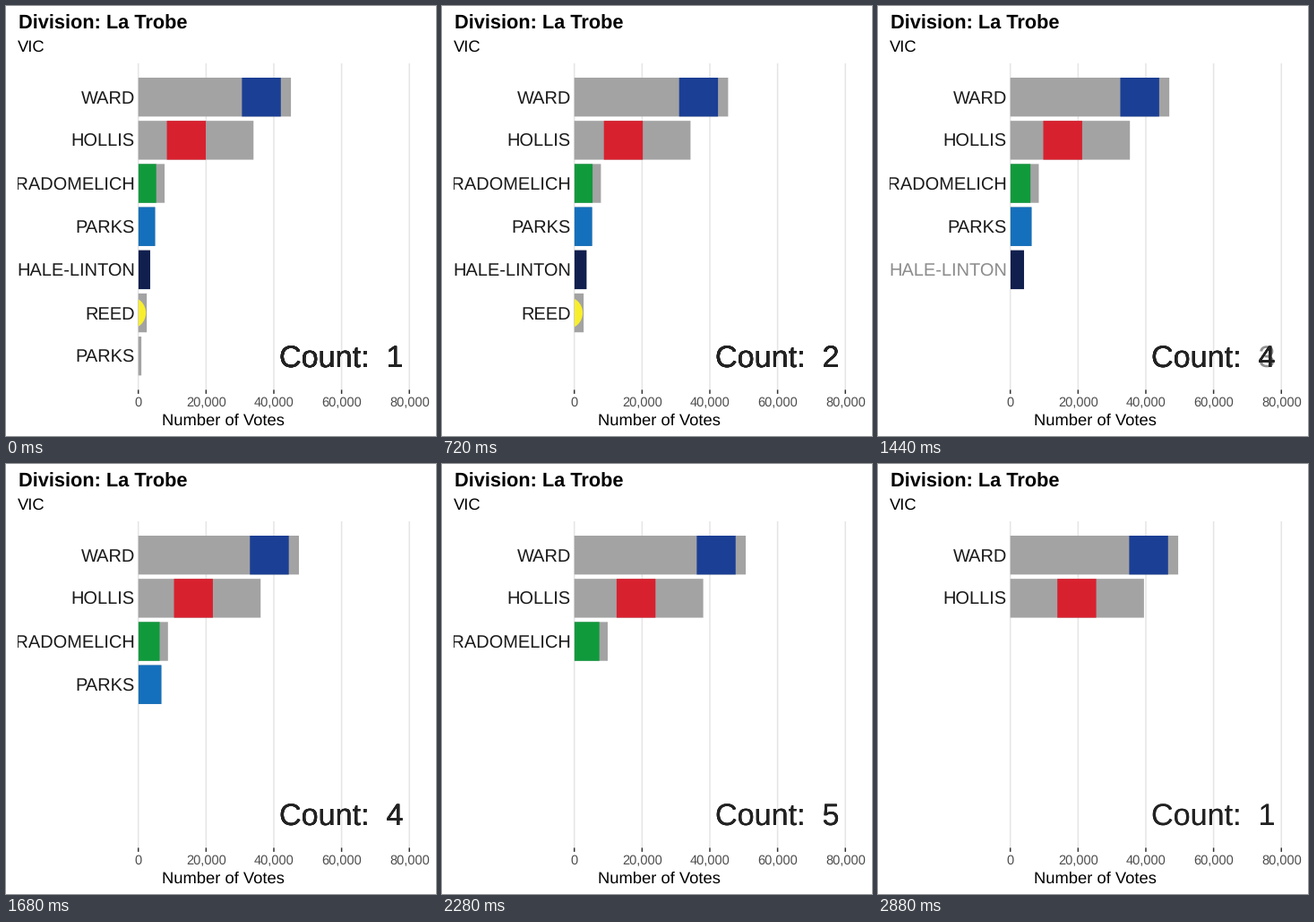
These frames come from a looping animation (480x480 px, 3000 ms). A matplotlib script:

```python
import matplotlib.pyplot as plt
from matplotlib.animation import ArtistAnimation
from matplotlib.patches import Circle, Rectangle

plt.rcParams.update({"font.family": "Liberation Sans", "text.hinting": "none"})

SIZE, DPI, FRAMES, INTERVAL = 480, 100, 25, 120
X0, PX_PER_1000 = 147.7, 3.782
TOP, BOTTOM = 64, 428.4
ROW0, ROW_STEP, BAR_H = 101.7, 48.17, 43.4

# Thousands of votes at each successive count; a short list means elimination.
# Logo: kind, colour, distance of its centre from the bar end, size.
CANDIDATES = [
    ("WARD", [45.05, 45.4, 46.45, 47.4, 50.6, 54.05], ("square", "#1B3F94", 33, BAR_H)),
    ("HOLLIS", [34.0, 34.3, 34.5, 36.1, 38.05, 44.9], ("square", "#D8212F", 75, BAR_H)),
    ("DRADOMELICH", [7.75, 7.85, 8.05, 8.75, 9.85], ("square", "#109A3C", 31, BAR_H)),
    ("PARKS", [4.95, 5.25, 5.75, 6.8], ("square", "#1470BC", BAR_H / 2, BAR_H)),
    ("HALE-LINTON", [3.5, 3.6, 4.05], ("square", "#101F4E", BAR_H / 2, BAR_H)),
    ("REED", [2.5, 2.75], ("circle", "#F8EE2C", 19, 36)),
    ("PARKS", [0.9], None),
]
# First and last frame of the move out of each count
MOVES = [(1, 4), (6, 9), (11, 13), (15, 17), (19, 21), (23, 25)]

fig = plt.figure(figsize=(SIZE / DPI, SIZE / DPI), dpi=DPI, facecolor="white")
ax = fig.add_axes([0, 0, 1, 1])
ax.set_xlim(0, SIZE)
ax.set_ylim(SIZE, 0)
ax.axis("off")


def hidden_box(x):
    box = Rectangle((x, 0), SIZE - x, SIZE, visible=False)
    return ax.add_patch(box)


panel_clip = hidden_box(X0)
label_clip = hidden_box(13)


def text(x, y, s, px, color="black", **kw):
    return ax.text(x, y, s, fontsize=px * 72 / DPI, color=color, va="baseline", **kw)


def line(x, y0, y1, color):
    ax.plot([x, x], [y0, y1], color=color, lw=1.5 * 72 / DPI,
            solid_capstyle="butt", zorder=0, snap=False)


def draw_axes():
    text(13.5, 25.5, "Division: La Trobe", 21.8, weight="bold")
    text(13, 50.6, "VIC", 18.33)
    text(242.3, 467.6, "Number of Votes", 18.33, ha="center")
    for votes in range(0, 100, 20):
        x = X0 + votes * PX_PER_1000
        line(x, TOP, BOTTOM, "#E5E5E5")
        line(x, BOTTOM, BOTTOM + 4.5, "#333333")
        text(x, 447.2, f"{votes * 1000:,}", 14.67, "#4D4D4D", ha="center")


def ease(p):
    return 4 * p ** 3 if p < 0.5 else 1 - 4 * (1 - p) ** 3


def phase(frame):
    """Current count index and eased progress towards the next one."""
    for k, (start, end) in enumerate(MOVES):
        if frame <= start:
            return k, 0.0
        if frame < end:
            return k, ease((frame - start) / (end - start))


def draw_logo(logo, end, y):
    kind, color, back, size = logo
    x = end - back
    if kind == "circle":
        shape = Circle((x, y), size / 2, fc=color, lw=0, zorder=2)
    else:
        shape = Rectangle((x - size / 2, y - size / 2), size, size,
                          fc=color, lw=0, zorder=2, snap=False)
    ax.add_patch(shape)
    shape.set_clip_path(panel_clip)
    return shape


def draw_row(i, name, value, logo, alpha):
    y = ROW0 + i * ROW_STEP
    width = value * PX_PER_1000
    bar = Rectangle((X0, y - BAR_H / 2), width, BAR_H, fc="#A3A3A3", lw=0,
                    alpha=alpha, zorder=1, snap=False)
    ax.add_patch(bar)
    label = text(144, y + 7.4, name, 20, "#1A1A1A", ha="right",
                 alpha=alpha, clip_on=True)
    label.set_clip_path(label_clip)
    parts = [bar, label]
    if logo:
        parts.append(draw_logo(logo, X0 + width, y))
    return parts


def count_text(k, alpha=1):
    return text(305.2, 403.2, f"Count:  {k + 1}", 34.1, "#222222", alpha=alpha)


def draw_frame(frame):
    k, p = phase(frame)
    after = (k + 1) % len(MOVES)
    shown = k if p < 0.5 else after
    artists, leaving = [], []
    for i, (name, votes, logo) in enumerate(CANDIDATES):
        if k >= len(votes):
            continue
        value, alpha = votes[k], 1
        if after < len(votes):
            value += (votes[after] - value) * p
            # one overlapping copy of the counter per remaining candidate
            artists.append(count_text(shown))
        else:
            alpha = 1 - p
            leaving.append(alpha)
        artists += draw_row(i, name, value, logo, alpha)
    return artists + [count_text(k, alpha) for alpha in leaving]


draw_axes()
anim = ArtistAnimation(fig, [draw_frame(f) for f in range(FRAMES)],
                       interval=INTERVAL, repeat=True, repeat_delay=0)
plt.show()
```
